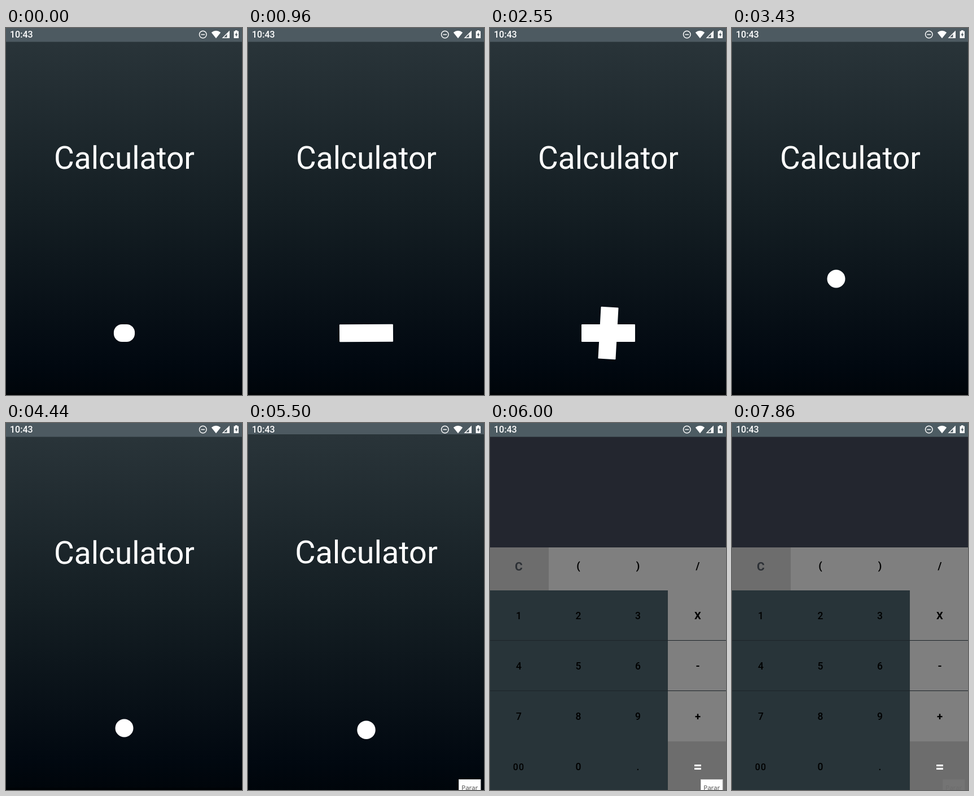
These frames come from a looping animation (418x649 px, 7930 ms). An HTML page:

```html
<!DOCTYPE html>
<html lang="en">
<head>
<meta charset="utf-8">
<title>Calculator</title>
<style>
  html, body { margin: 0; width: 100%; height: 100%; overflow: hidden; background: #000; }
  svg { display: block; width: 418px; height: 649px; font-family: Roboto, "Open Sans", sans-serif; }
  #keys text { text-anchor: middle; font-size: 17.5px; font-weight: 500; }
  #keys .op { font-size: 18.5px; font-weight: 700; }
</style>
</head>
<body>
<svg viewBox="0 0 418 649">
  <defs>
    <linearGradient id="night" x1="0" y1="0" x2="0" y2="1">
      <stop offset="0" stop-color="#2b363b"/>
      <stop offset=".5" stop-color="#141e23"/>
      <stop offset=".92" stop-color="#010810"/>
      <stop offset="1" stop-color="#00050a"/>
    </linearGradient>
  </defs>

  <g id="splash">
    <rect width="418" height="649" fill="url(#night)"/>
    <rect width="418" height="24.5" fill="#4d5a61"/>
    <rect y="645" width="418" height="4" fill="#000306"/>
    <text x="209.5" y="249" font-size="55" text-anchor="middle" fill="#fff">Calculator</text>
    <g id="loader" fill="#fff">
      <g id="sign">
        <rect id="level"/>
        <g id="turn"><rect id="bar"/><rect id="dotA"/><rect id="dotB"/></g>
      </g>
      <path id="hook" d="M184.5 443.5A27.2 27.2 0 0 1 239 443.5C239 466 209.5 470 209.5 499"
        pathLength="100" fill="none" stroke="#fff" stroke-linecap="round"/>
      <circle id="point" cx="209.5" cy="539.5"/>
    </g>
  </g>

  <g id="calc">
    <rect width="418" height="649" fill="#23262f"/>
    <rect width="418" height="24.5" fill="#4d5c63"/>
    <rect y="220" width="418" height="429" fill="#7f7f7f"/>
    <rect y="220" width="104" height="76" fill="#6d6d6d"/>
    <rect y="296" width="315" height="353" fill="#283439"/>
    <rect x="315" y="563" width="103" height="86" fill="#6d6d6d"/>
    <path d="M0 384.5H418M0 473.5H418" stroke="#1d2429"/>
    <g id="keys"></g>
  </g>

  <g fill="#fff">
    <text x="7" y="17" font-size="16" font-weight="500">10:43</text>
    <circle cx="348.8" cy="11.5" r="6.3" fill="none" stroke="#fff" stroke-width="1.4"/>
    <path d="M345.5 10.8h6.6v1.5h-6.6z"/>
    <path d="M363.8 8Q372 1.5 380.2 8L372 18.2z"/>
    <path d="M395.2 6.3V17.3H384.2z" fill="none" stroke="#fff" stroke-width="1.4"/>
    <path d="M391.5 10L396 5.5V18H391.5z"/>
    <path d="M406 5.5V4h3.6v1.5h2.4V18h-8.4V5.5z"/>
    <path d="M408.6 7.6L405.5 12.6H407.4V16L410.3 11H408.6z" fill="#4d5a61"/>
  </g>

  <g id="tip">
    <rect x="373.5" y="630.5" width="38.5" height="22" fill="#fff" stroke="#d0d0d0"/>
    <text x="392.7" y="649" font-size="11.5" text-anchor="middle" fill="#444"
      style="font-family:'Open Sans','Noto Sans',sans-serif">Parar</text>
  </g>
</svg>

<script>
const LOOP = 7930, CX = 209.5, CY = 539.5;
const el = id => document.getElementById(id);
const set = (id, attrs) => {
  for (const name in attrs) el(id).setAttribute(name, attrs[name]);
};
const show = (id, on) => { el(id).style.display = on ? '' : 'none'; };
const clamp = x => Math.min(1, Math.max(0, x));
const part = (t, from, to) => clamp((t - from) / (to - from));
const smooth = x => x * x * (3 - 2 * x);

// Value at time t from [time, value] steps
function track(t, steps) {
  let [t0, v0] = steps[0];
  for (const [t1, v1] of steps) {
    if (t < t1) return v0 + (v1 - v0) * smooth(part(t, t0, t1));
    t0 = t1; v0 = v1;
  }
  return v0;
}

const box = (id, x, y, w, h, r) =>
  set(id, { x: x - w / 2, y: y - h / 2, width: w, height: h, rx: r });

const columns = [51, 156.5, 262, 368];
const rows = [[253, 'C()/'], [340.5, '123X'], [430, '456-'], [519, '789+'], [608, '\u00300.=']];
rows.forEach(([y, chars], r) => [...chars].forEach((ch, c) => {
  const key = document.createElementNS('http://www.w3.org/2000/svg', 'text');
  const equals = ch === '=', clear = ch === 'C';
  key.textContent = r === 4 && c === 0 ? '00' : ch;
  key.setAttribute('x', columns[c]);
  key.setAttribute('y', y + (equals ? 9 : clear ? 7.5 : 6));
  if (c === 3 || r === 0) key.setAttribute('class', 'op');
  if (equals) { key.style.fontSize = '27px'; key.style.fill = '#fff'; }
  if (clear) { key.style.fontSize = '21px'; key.style.fill = '#2c3035'; }
  if (r === 4 && c === 0) { key.style.fontSize = '16px'; key.style.letterSpacing = '1.2px'; }
  el('keys').append(key);
}));

function drawSign(t) {
  show('sign', t < 3430);
  const fall = 156 * part(t, 3112, 3430) ** 2;
  set('sign', { transform: `translate(${CX} ${CY + fall})` });

  const grow = 1 - (1 - part(t, 0, 620)) ** 2;
  const length = t < 700 ? 37 + 58 * grow
    : track(t, [[2450, 95], [2550, 92], [2720, 84], [2950, 95]]);
  const angle = track(t, [[930, 0], [1560, -60], [1730, -60], [2300, -90], [2500, -90], [2950, 0]]);
  const split = track(t, [[2560, 0], [2950, 31]]);
  set('turn', { transform: `translate(0 ${split}) rotate(${angle})` });
  box('bar', 0, 0, length, 31, 1 + 13.5 * (1 - grow));

  // The two dots square off into the arms of the plus
  const dots = t > 950 && t < 2400;
  const gap = track(t, [[950, 0], [1540, 37], [1730, 37], [2250, 31.5]]);
  const size = track(t, [[950, 28], [1500, 33], [1730, 33], [2250, 32]]);
  const round = track(t, [[1640, 14], [2250, 1]]);
  show('dotA', dots);
  show('dotB', dots);
  box('dotA', 0, -gap, size, size, round);
  box('dotB', 0, gap, size, size, round);

  show('level', t >= 2400);
  box('level', 0, -split, 95, 31, 1);
}

function drawQuestion(t) {
  const head = track(t, [[3430, 0], [3740, 100]]);
  const tail = track(t, [[4080, 0], [4420, 100]]);
  const width = 32 * part(t, 3330, 3420) * (1 - part(t, 4390, 4440));
  show('hook', width > 0);
  set('hook', {
    'stroke-width': width,
    'stroke-dasharray': `${Math.max(.01, head - tail)} 300`,
    'stroke-dashoffset': -Math.min(tail, 99.9)
  });
  set('point', { r: track(t, [[3560, 0], [3730, 16]]) });
}

function scale(id, k) {
  set(id, { transform: `translate(209 324.5) scale(${k}) translate(-209 -324.5)` });
}

function render(t) {
  drawSign(t);
  drawQuestion(t);

  const start = 5467;
  const open = 1 - (1 - part(t, start, start + 400)) ** 4;
  scale('splash', 1 + .05 * open);
  scale('calc', .85 + .15 * open);
  show('calc', t >= start);
  set('calc', { opacity: part(t, start + 50, start + 133) });

  show('tip', t >= 5360);
  set('tip', { opacity: t < 7790 ? 1 : t < 7860 ? .5 : .05 });
}

const began = performance.now();
function tick() {
  render((performance.now() - began) % LOOP);
  requestAnimationFrame(tick);
}
render(0);
requestAnimationFrame(tick);
</script>
</body>
</html>
```
